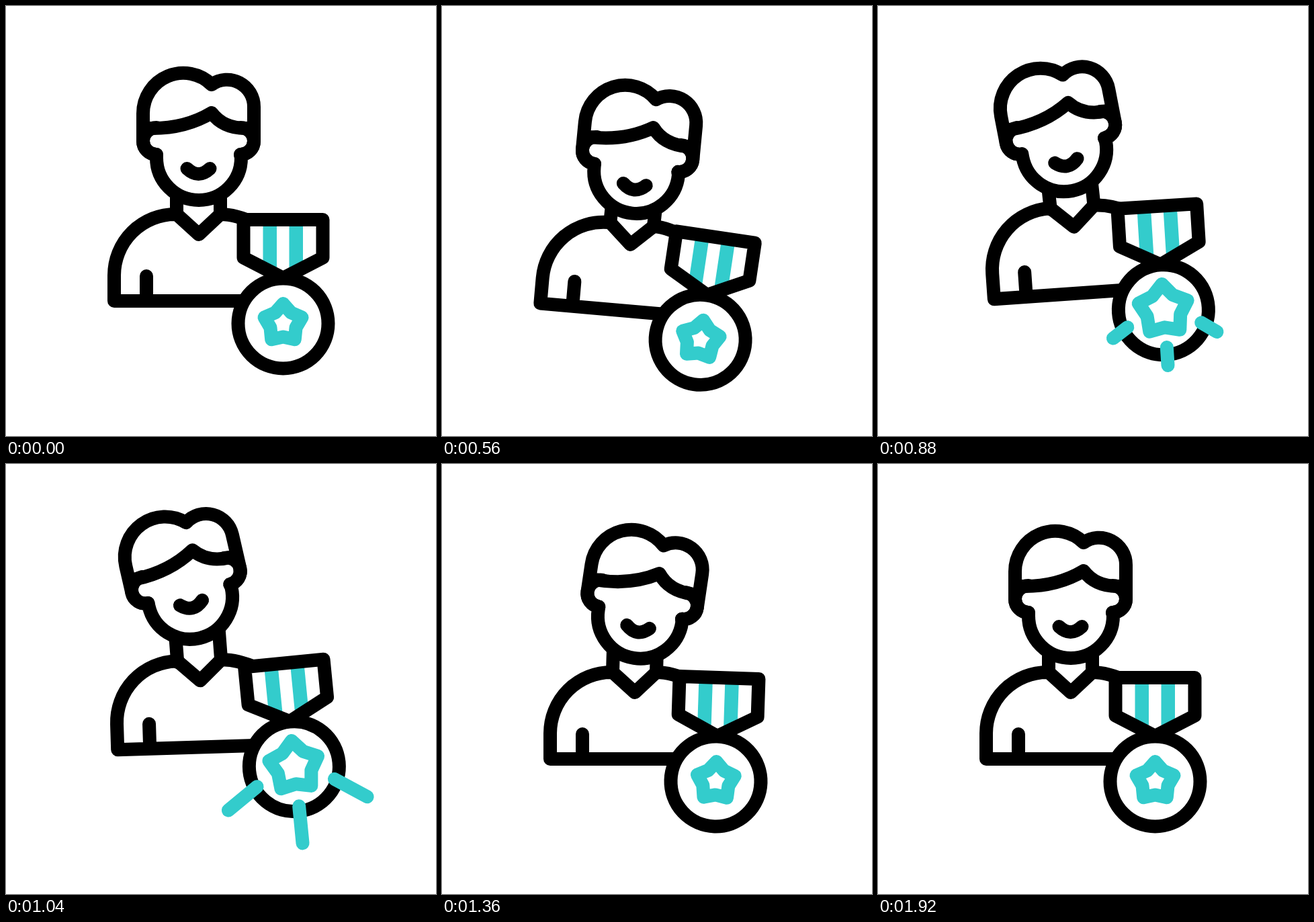
Write an HTML page with a canvas that moves like this. It is 640x640 px and loops after 2160 ms.

```html
<!DOCTYPE html>
<html lang="en">
<head>
<meta charset="utf-8">
<title>Medal winner</title>
<style>
  html, body { margin: 0; width: 100%; height: 100%; overflow: hidden; background: #fff; }
  canvas { display: block; width: 100vw; height: 100vh; }
</style>
</head>
<body>
<canvas id="stage" width="640" height="640"></canvas>
<script>
const ctx = document.getElementById('stage').getContext('2d');
const LOOP = 2160, STEP = 40;
const INK = '#000', TEAL = '#33cccc';

const TORSO = new Path2D('M380 439H161V401A91 91 0 0 1 252 310H254L287 340L319 310Q342 310 372 324M209 402V439');
const NECK = new Path2D('M254 255V310M319 255V310');
const SKULL = new Path2D('M224 221A20 20 0 0 1 204 201V160A60 60 0 0 1 306 117A40 40 0 0 1 369 150' +
  'V201A20 20 0 0 1 349 221L350 226A63 63 0 0 1 224 226Z');
const EARS = new Path2D('M224 221A20 20 0 0 1 224 181M349 221A20 20 0 0 0 349 181');
const FRINGE = new Path2D('M206 182H214Q266 183 306 159Q324 183 359 182H367');
const MOUTH = new Path2D('M269.5 242Q286.5 258 303.5 242');
const RIBBON = new Path2D('M353.5 318H471.5V374.6L412.5 405L353.5 374.6Z');

const rad = deg => deg * Math.PI / 180;

// Eased 0 to 1 between two times.
function ease(t, from, to) {
  const u = Math.min(1, Math.max(0, (t - from) / (to - from)));
  return u * u * (3 - 2 * u);
}

// Eases up between a and b, holds, eases down between c and d.
const pulse = (t, a, b, c, d) => ease(t, a, b) - ease(t, c, d);

// All movement is a mix of a dip, a sway, a leap and the rebound after it.
function poseAt(t) {
  const dip = pulse(t, 0, 440, 560, 760);
  const sway = pulse(t, 600, 760, 760, 1240);
  const leap = pulse(t, 600, 1080, 1080, 1220);
  const nod = pulse(t, 1080, 1300, 1300, 1700);
  const kick = pulse(t, 1080, 1200, 1200, 1460);
  const back = pulse(t, 1400, 1600, 1600, 1920);
  const mix = (d, s, l) => d * dip + s * sway + l * leap;
  return {
    body: { x: mix(-6.5, 5.5, 0), y: mix(15, 0, -18), turn: mix(5, -4.75, 0) },
    head: { x: mix(-1.7, 1, -1.5), y: mix(4.4, 8.2, -15.4), turn: mix(5.5, -4.5, -11.5) + 9 * nod },
    mouth: mix(3.8, 9.8, -11),
    medal: mix(8.5, 0, -5.7) + 5.6 * kick - 2 * back,
    star: 29.4 + 9 * pulse(t, 560, 720, 1040, 1280),
    rayStart: 67 * Math.max(0, (t - 680) / 520) ** 8,
    rayEnd: 67 * ease(t, 680, 1140)
  };
}

function line(path, color = INK) {
  ctx.strokeStyle = color;
  ctx.stroke(path);
}

function shape(path) {
  ctx.fillStyle = '#fff';
  ctx.fill(path);
  line(path);
}

function turnAt(x, y, deg) {
  ctx.translate(x, y);
  ctx.rotate(rad(deg));
  ctx.translate(-x, -y);
}

function part(draw) {
  ctx.save();
  draw();
  ctx.restore();
}

// Carries a joint along with the body, without the body's turn.
function followBody({ x, y, turn }, px, py) {
  const a = rad(turn), dx = px - 287, dy = py - 340;
  ctx.translate(x + dx * Math.cos(a) - dy * Math.sin(a) - dx,
                y + dx * Math.sin(a) + dy * Math.cos(a) - dy);
}

function drawTorso({ body, head }) {
  ctx.translate(body.x, body.y);
  turnAt(287, 340, body.turn);
  line(TORSO);
  turnAt(287, 310, head.turn * 0.2);
  line(NECK);
}

function drawHead({ body, head, mouth }) {
  followBody(body, 287, 280);
  ctx.translate(head.x, head.y);
  turnAt(287, 280, head.turn);
  shape(SKULL);
  line(EARS);
  line(FRINGE);
  ctx.translate(0, mouth);
  line(MOUTH);
}

function starPath(r) {
  const p = new Path2D();
  for (let i = 0; i < 10; i++) {
    const a = i * Math.PI / 5, d = i % 2 ? r * 0.68 : r;
    p.lineTo(d * Math.sin(a), -d * Math.cos(a));
  }
  p.closePath();
  return p;
}

function drawRays({ rayStart, rayEnd }) {
  if (rayEnd <= rayStart) return;
  const p = new Path2D();
  const add = (x, y, dx, dy) => {
    p.moveTo(x + dx * rayStart, y + dy * rayStart);
    p.lineTo(x + dx * rayEnd, y + dy * rayEnd);
  };
  for (const side of [-1, 1]) add(55 * side, 22.5, 0.83 * side, 0.56);
  add(1.5, 56, 0, 1);
  line(p, TEAL);
}

function drawMedal(pose) {
  followBody(pose.body, 412.5, 318);
  turnAt(412.5, 318, pose.medal);
  ctx.fillStyle = '#fff';
  ctx.fill(RIBBON);
  part(() => {
    ctx.clip(RIBBON);
    ctx.fillStyle = TEAL;
    for (const x of [382.5, 421.5]) ctx.fillRect(x, 318, 20.5, 90);
  });
  line(RIBBON);
  ctx.translate(412.5, 472.5);
  const disc = new Path2D();
  disc.arc(0, 0, 67, 0, 2 * Math.PI);
  shape(disc);
  line(starPath(pose.star), TEAL);
  drawRays(pose);
}

function frame(time) {
  const pose = poseAt(Math.floor(time % LOOP / STEP) * STEP);
  ctx.fillStyle = '#fff';
  ctx.fillRect(0, 0, 640, 640);
  ctx.lineWidth = 20;
  ctx.lineCap = ctx.lineJoin = 'round';
  for (const draw of [drawTorso, drawHead, drawMedal]) part(() => draw(pose));
}

let start;
function tick(now) {
  start ??= now;
  frame(now - start);
  requestAnimationFrame(tick);
}
frame(0);
requestAnimationFrame(tick);
</script>
</body>
</html>
```
